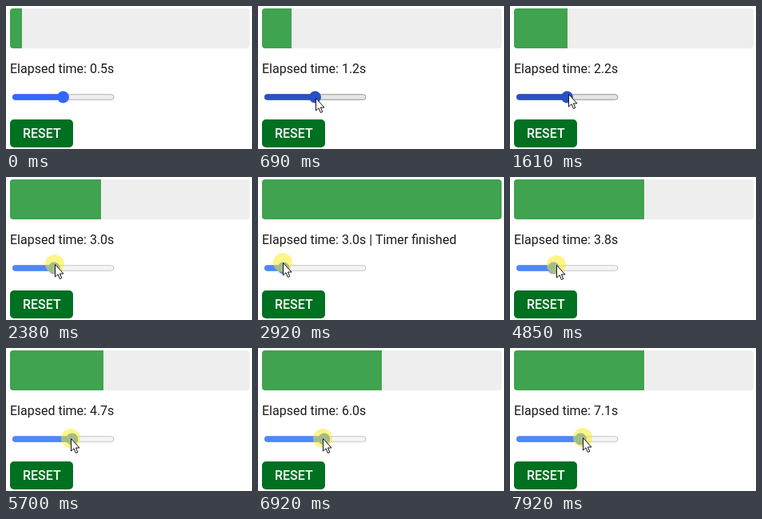
An HTML page for the animation above (8000 ms loop, 308 px wide and 179 px high).

```html
<!DOCTYPE html>
<html lang="en">
<head>
<meta charset="utf-8">
<title>Timer</title>
<style>
  html, body { margin: 0; width: 100%; height: 100%; overflow: hidden; background: #fff; }
  svg { display: block; width: 308px; height: 179px; }
  text { font: 16px Roboto, sans-serif; fill: #1b1b1b; white-space: pre; }
  #track { fill: #efefef; stroke: #b2b2b2; }
  #fill, #thumb { fill: #3367fa; }
  .hover #track { fill: #e5e5e5; stroke: #959595; }
  .hover #fill, .hover #thumb { fill: #2850c4; }
  .active #track { fill: #f5f5f5; stroke: #c4c4c4; }
  .active #fill, .active #thumb { fill: #4d88fa; }
</style>
</head>
<body>
<svg viewBox="0 0 308 179">
  <clipPath id="round"><rect x="5" y="3" width="300" height="50" rx="4"/></clipPath>
  <g clip-path="url(#round)">
    <rect x="5" y="3" width="300" height="50" fill="#eee"/>
    <rect id="bar" x="5" y="3" height="50" fill="#3fa34f"/>
  </g>
  <text id="label" x="5" y="84"></text>
  <g id="slider">
    <rect id="track" x="8.5" y="110.75" width="126.5" height="6.5" rx="3.25"/>
    <rect id="fill" x="8" y="110.25" height="7.5" rx="3.75"/>
    <circle id="thumb" cy="114" r="7.5"/>
  </g>
  <rect id="button" x="5" y="142" width="79" height="35" rx="5"/>
  <text x="21" y="165" style="fill:#fff; font-weight:500">RESET</text>
  <g id="pointer">
    <circle id="glow" r="12" fill="#faeb1e" fill-opacity=".52"/>
    <path d="M.5 .5V16L4 12.8 6.4 18.5 8.8 17.5 6.4 12H11Z" fill="#fff" stroke="#111"/>
  </g>
</svg>
<script>
const LOOP = 8, FRAMES = 104, PRESS = 1.8, RESUME = 4.4;
const $ = id => document.getElementById(id);
const set = (id, name, value) => $(id).setAttribute(name, value);

const easeOut = u => 1 - (1 - Math.min(1, Math.max(0, u))) ** 2;

// pointer gestures, each easing on from where the last one ended
const moves = [
  { start: .1, length: .8, x: 73, y: 110 },
  { start: 2.27, length: .72, x: 31, y: 107 },
  { start: 4.39, length: 1.42, x: 81.4, y: 113 },
  { start: 6.95, length: .4, x: 67, y: 113 },
  { start: 7.69, length: .3, x: 92.3, y: 112 }
];

function pointerAt(s) {
  let x = 58, y = 190;
  for (const move of moves) {
    const k = easeOut((s - move.start) / move.length);
    x += (move.x - x) * k;
    y += (move.y - y) * k;
  }
  return [x, y];
}

function draw(now) {
  const s = Math.floor((now + 8) * FRAMES / LOOP / 1000) % FRAMES * LOOP / FRAMES;
  const [x, y] = pointerAt(s);
  const active = s > PRESS, hover = y < 122;

  const duration = active ? Math.round((x - 15.9) / 5.65) : 10;
  const running = 1.06 * s + (s < RESUME ? .51 : -1.335);  // the clock stood still until the resume
  const elapsed = Math.min(running, duration);
  const done = running >= duration;
  const thumb = 15 + 5.65 * duration;

  set('bar', 'width', Math.round(300 * elapsed / duration));
  $('label').textContent = `Elapsed time: ${elapsed.toFixed(1)}s` + (done ? ' | Timer finished' : '');
  set('slider', 'class', active ? 'active' : hover ? 'hover' : '');
  set('fill', 'width', thumb - 8);
  set('thumb', 'cx', thumb);
  set('button', 'fill', y > 142 && y < 177 ? '#005c1b' : '#007021');
  set('pointer', 'transform', `translate(${Math.round(x)} ${Math.round(y)})`);
  set('glow', 'visibility', active ? 'visible' : 'hidden');
}

const start = performance.now();
function tick() {
  draw(performance.now() - start);
  requestAnimationFrame(tick);
}
tick();
</script>
</body>
</html>
```
